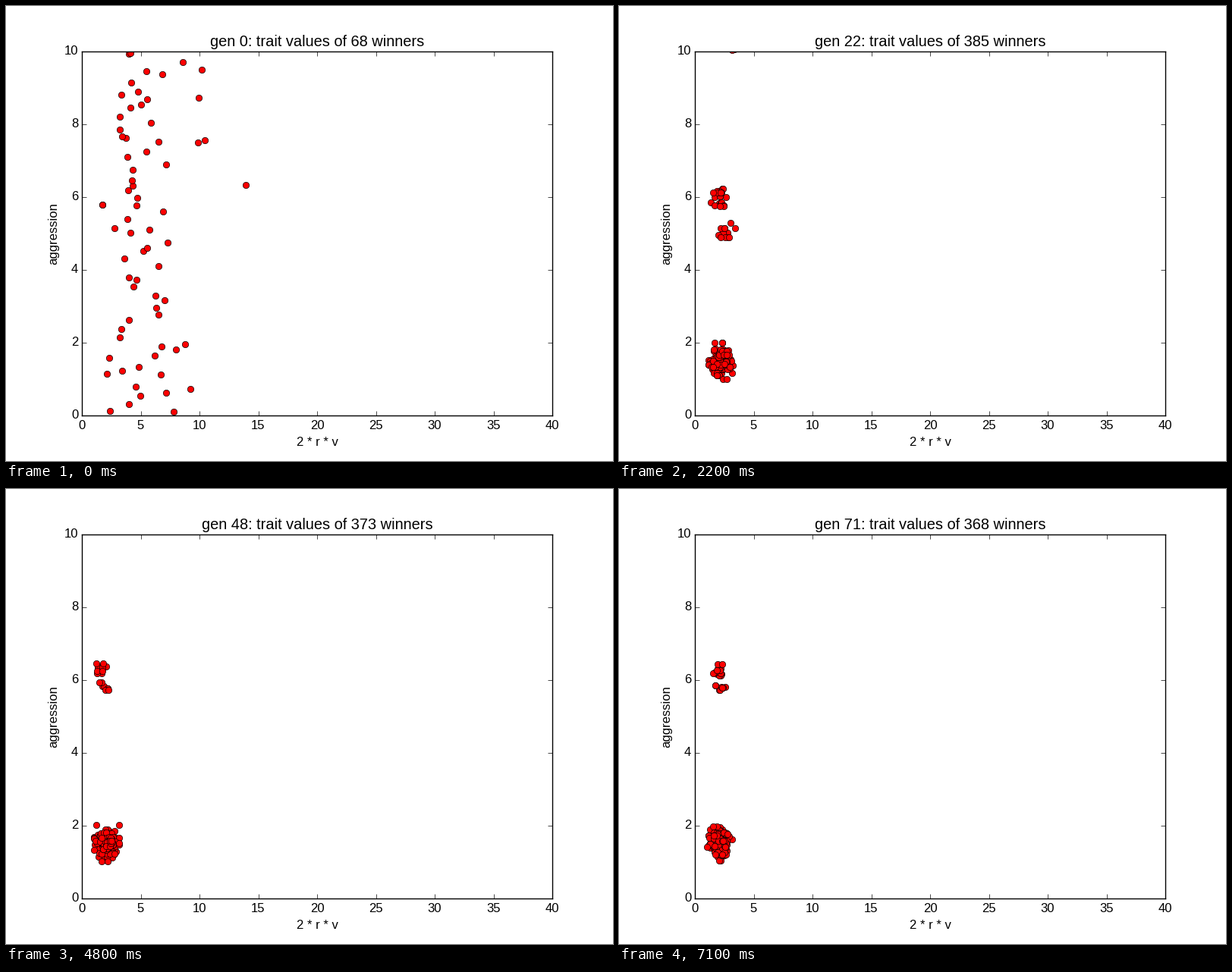
A matplotlib script that plays this animation: 800x600 px, repeating every 7.2 s.

```python
import matplotlib.pyplot as plt
import numpy as np
from matplotlib.animation import FuncAnimation

GENS, STEP_MS = 72, 100
TURNOVER = 7  # generations before a member is replaced by a mutant

plt.style.use("classic")
plt.rcParams.update({
    "font.family": "sans-serif",
    "font.sans-serif": ["Liberation Sans", "DejaVu Sans"],
    "font.size": 12,
    "ytick.alignment": "center",
    "ytick.major.pad": 3.5,
    "figure.facecolor": "white",
    "savefig.facecolor": "white",
    "savefig.dpi": 100,
})

rng = np.random.default_rng(11)


class Lineage:
    """A family whose centre drifts along (gen, x, y) points while members turn over."""

    def __init__(self, path, spread, size, end=np.inf):
        self.gens, self.xs, self.ys = np.array(path).T
        pair = np.arange(size) // 2  # siblings share their aggression
        epochs = GENS // TURNOVER + 2
        raw = np.clip(rng.normal(0, 1, (epochs, size, 2)), -2.5, 2.5)
        self.offset = np.stack([raw[:, :, 0], raw[:, pair, 1]], axis=2) * spread
        self.phase = rng.integers(0, TURNOVER, size)[pair]
        self.birth = rng.integers(1, 5, size)
        self.birth[0] = 0
        self.death = end * (1 - 0.35 * rng.random(size))
        self.death[0] = end

    def at(self, gen):
        epoch = (gen + self.phase) // TURNOVER
        off = self.offset[epoch, np.arange(len(epoch))] * min(gen / 6, 1)
        centre = [np.interp(gen, self.gens, v) for v in (self.xs, self.ys)]
        alive = (self.birth <= gen) & (gen < self.death)
        return (centre + off)[alive]


LINEAGES = [
    Lineage([(0, 2.35, 1.58), (14, 2.3, 1.48), (35, 2.1, 1.52), (71, 2.1, 1.55)],
            (0.42, 0.2), 170),
    Lineage([(0, 1.75, 5.8), (14, 2.05, 6.05), (35, 2.05, 6.13),
             (48, 1.55, 6.35), (58, 1.5, 6.33), (71, 1.95, 6.25)],
            (0.24, 0.1), 14),
    Lineage([(0, 1.75, 5.8), (14, 1.95, 5.8), (71, 2.1, 5.79)], (0.25, 0.06), 8),
    Lineage([(0, 2.8, 5.15), (14, 2.7, 5.12), (22, 2.45, 5.08)], (0.4, 0.17), 18, 30),
    Lineage([(0, 3.4, 7.67), (14, 2.95, 7.65)], (0.1, 0.02), 4, 20),
    Lineage([(0, 3.35, 8.82), (14, 3.4, 8.92)], (0.18, 0.01), 5, 20),
    Lineage([(0, 4.15, 9.95), (22, 3.4, 10.04)], (0.35, 0.03), 5, 24),
]

# Founders at the edge of the first cloud; the rest are drawn at random.
EDGE = [(13.95, 6.33), (10.2, 9.5), (9.95, 8.73), (10.45, 7.57), (9.85, 7.5),
        (9.2, 0.73), (8.75, 1.95), (2.4, 0.13), (2.1, 1.15)]
FOUNDERS = 68


def make_founders():
    n = FOUNDERS - len(EDGE) - len(LINEAGES) + 1  # two lineages share a founder
    x = np.clip(rng.lognormal(np.log(5.2), 0.28, n), 3.2, 8.6)
    y = 10 * (np.arange(n) + rng.random(n)) / n
    return np.vstack([np.column_stack([x, y]), EDGE])


def make_cloud():
    """Founders and their children; the larger the trait, the sooner they lose."""
    founders = make_founders()
    kids = np.repeat(founders, 4, axis=0)
    birth = np.r_[np.zeros(len(founders)), rng.integers(1, 4, len(kids))]
    kids += rng.normal(0, 1, kids.shape) * (0.4, 0.08) - (0.2, 0)
    xy = np.vstack([founders, np.clip(kids, (0.9, 0.1), (40, 10))])
    death = 12 - 1.8 * (xy[:, 0] - 1.75) + rng.normal(0, 0.7, len(xy))
    return xy, birth, np.clip(death, 1, 13)


CLOUD, BIRTH, DEATH = make_cloud()

# (generation, winners) between which the count runs evenly
WINNERS = np.array([(0, 68), (1, 260), (5, 368), (14, 375), (22, 385),
                    (35, 368), (48, 373), (58, 370), (71, 368)]).T


def points_at(gen):
    cloud = CLOUD[(BIRTH <= gen) & (gen < DEATH)]
    return np.vstack([cloud] + [line.at(gen) for line in LINEAGES]).T


fig = plt.figure(figsize=(8, 6), dpi=100, facecolor="white")
ax = fig.add_axes([0.125, 0.1, 0.775, 0.8])
ax.set(xlim=(0, 40), ylim=(0, 10), xlabel="2 * r * v",
       xticks=range(0, 41, 5), yticks=range(0, 11, 2))
ax.set_ylabel("aggression", labelpad=4.3)
dots, = ax.plot([], [], "o", ms=6, mfc="red", mec="black", mew=0.5)
title = ax.set_title("")


def draw(gen):
    winners = round(np.interp(gen, *WINNERS))
    dots.set_data(*points_at(gen))
    title.set_text(f"gen {gen}: trait values of {winners} winners")
    return dots, title


anim = FuncAnimation(fig, draw, frames=GENS, interval=STEP_MS,
                     repeat=True, repeat_delay=0, blit=False)
plt.show()
```
